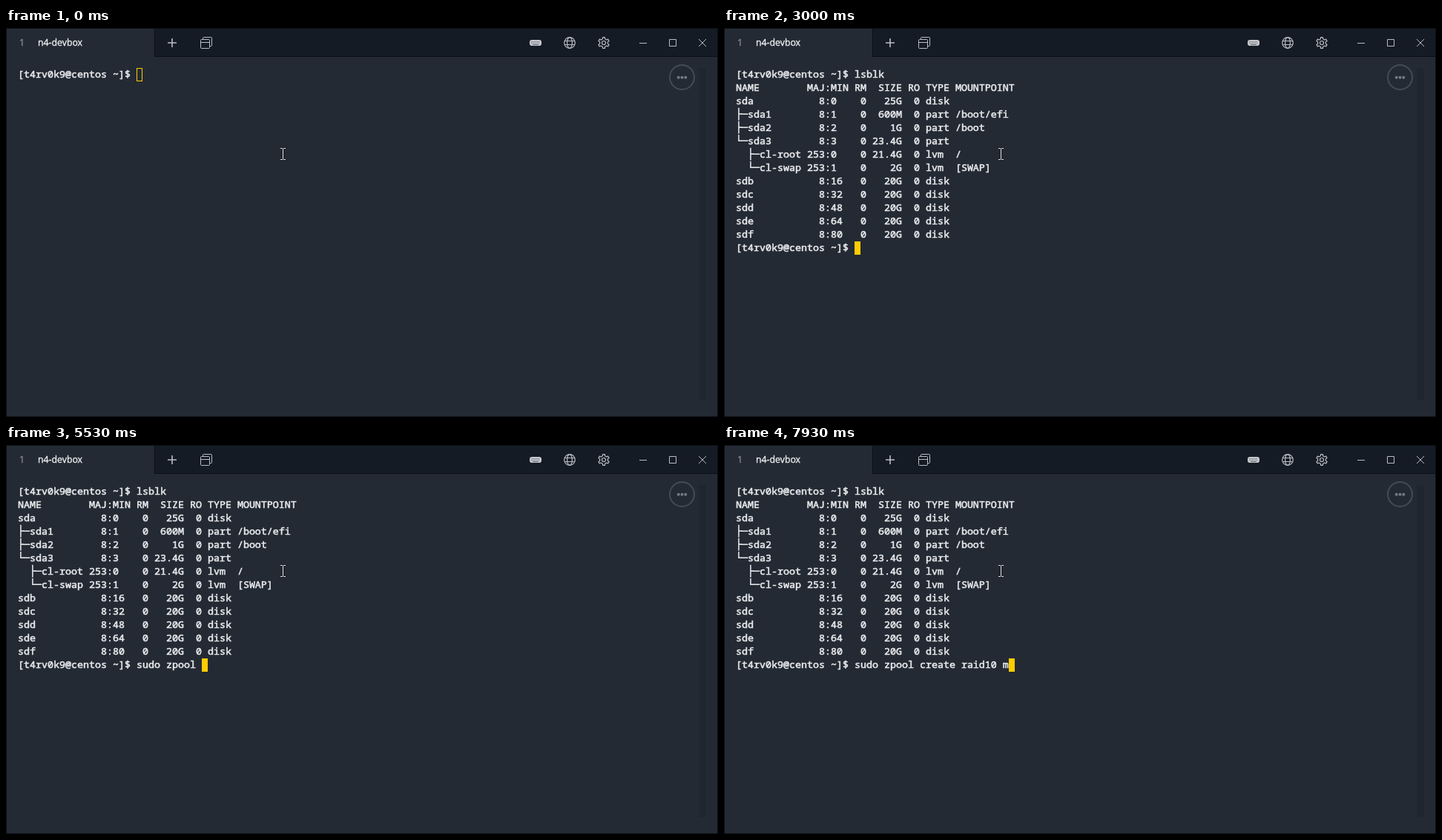
These frames come from a looping animation (960x525 px, 8000 ms). An HTML page:

```html
<!DOCTYPE html>
<html lang="en">
<head>
<meta charset="utf-8">
<title>Terminal</title>
<style>
  html, body { margin: 0; width: 100%; height: 100%; overflow: hidden; background: #242a34; }
  #stage { position: relative; width: 960px; height: 525px; overflow: hidden; background: #242a34; }
  #stage > * { position: absolute; }
  svg { left: 0; top: 0; }
  .label {
    font: 500 12.3px/16px "Open Sans", "Noto Sans", sans-serif; top: 12px; white-space: pre;
    -webkit-text-stroke: .35px currentColor;
  }
  #screen {
    left: 16px; top: 53px; margin: 0; color: #eaecee;
    font: 500 13.3333px/18px "Noto Sans Mono", "DejaVu Sans Mono", monospace;
    -webkit-text-stroke: .55px currentColor;
    font-variant-ligatures: none; white-space: pre;
  }
  #cursor { box-sizing: border-box; width: 8px; height: 18px; border: 1px solid #ffcc00; }
</style>
</head>
<body>
<div id="stage">
  <svg width="960" height="525" fill="none">
    <path fill="#141b25" d="M0 0H960V39H0z"/>
    <path fill="#242a34" d="M1 1H200V39H1z"/>
    <path stroke="#0b0f15" d="M200.5 0V38.5H960M.5 0V525M0 .5H960M959.5 0V525M0 524.5H960"/>
    <path fill="#1e2730" d="M934 54H944V503H934z"/>

    <g stroke="#b9bdc3">
      <path stroke-width="1.6" d="M218 20H230M224 14V26"/>
      <rect x="262.5" y="15.5" width="12" height="12" rx="1"/>
      <path d="M262.5 19.5H274.5M265.5 15V13.5Q265.5 12.5 266.5 12.5H276.5Q277.5 12.5 277.5 13.5V23.5Q277.5 24.5 276.5 24.5H275"/>
      <g stroke-width="1.2">
        <circle cx="760" cy="20" r="7.3"/>
        <ellipse cx="760" cy="20" rx="3.4" ry="7.3"/>
        <path d="M753.4 17.5H766.6M753.4 22.5H766.6"/>
        <path id="gear" stroke-linejoin="round"/>
        <circle cx="806" cy="20" r="2.5"/>
      </g>
      <path d="M854 20.5H864M894.5 15.5H903.5V24.5H894.5zM934 15L944 25M944 15L934 25"/>
    </g>

    <rect x="706" y="16" width="16" height="8" rx="3" fill="#c6c9ce"/>
    <path stroke="#5d636c" stroke-dasharray="1 1" d="M708 18.5H720M708 20.5H720"/>
    <path stroke="#5d636c" d="M710 22.5H718"/>

    <circle cx="911.5" cy="66.5" r="16.5" stroke="#434b56" stroke-width="2"/>
    <g fill="#747a83">
      <circle cx="906.7" cy="66.8" r="2"/><circle cx="911.5" cy="66.8" r="2"/><circle cx="916.3" cy="66.8" r="2"/>
    </g>
  </svg>

  <div class="label" style="left:18px; color:#858b94">1</div>
  <div class="label" style="left:43px; color:#eef0f2">n4-devbox</div>

  <pre id="screen"></pre>
  <div id="cursor"></div>

  <svg width="960" height="525" fill="none">
    <path stroke="#11151b" stroke-width="3" d="M370 162.5H377M373.5 162V178M370 177.5H377" opacity=".45"/>
    <path stroke="#e8eaec" d="M370 162.5H373M374 162.5H377M373.5 163V177M370 177.5H373M374 177.5H377"/>
  </svg>
</div>

<script>
const LOOP = 8000, CELL = 8, ROW = 18, LEFT = 16, TOP = 54;
const PROMPT = "[t4rv0k9@centos ~]$ ";
const LISTING = `NAME        MAJ:MIN RM  SIZE RO TYPE MOUNTPOINT
sda           8:0    0   25G  0 disk
├─sda1        8:1    0  600M  0 part /boot/efi
├─sda2        8:2    0    1G  0 part /boot
└─sda3        8:3    0 23.4G  0 part
  ├─cl-root 253:0    0 21.4G  0 lvm  /
  └─cl-swap 253:1    0    2G  0 lvm  [SWAP]
sdb           8:16   0   20G  0 disk
sdc           8:32   0   20G  0 disk
sdd           8:48   0   20G  0 disk
sde           8:64   0   20G  0 disk
sdf           8:80   0   20G  0 disk`;

const RUN_AT = 3000;
const before = PROMPT;
const after = PROMPT + "lsblk\n" + LISTING + "\n" + PROMPT;

// Each step: time, typed text, cursor look
const steps = [[0, "", "hollow"], [1330, "", "solid"], [1730, "", "off"], [2270, "", "solid"]];
const show = (time, text) => steps.push([time, text, "solid"]);

// Types chars after base, spread evenly from start to end
function type(base, chars, start, end = start) {
  const gap = chars.length > 1 ? (end - start) / (chars.length - 1) : 0;
  for (let i = 0; i < chars.length; i++) show(start + gap * i, base + chars.slice(0, i + 1));
}

type("", "lsb", 2470, 2600);
type("lsb", "lk", 2800, 2900);
show(RUN_AT, "");
type("", "sudo ", 3270, 3670);
type("sudo ", "zp", 3870, 3930);
show(4070, "sudo zpool ");
type("sudo zpool ", "vr", 4530, 4670);
show(5070, "sudo zpool v");
show(5530, "sudo zpool ");
type("sudo zpool ", "c", 5730);
type("sudo zpool c", "reate", 5930, 6330);
type("sudo zpool create", " ", 6600);
type("sudo zpool create ", "raid", 6870, 7200);
type("sudo zpool create raid", "1", 7530);
type("sudo zpool create raid1", "0 m", 7670, 7930);

const screen = document.getElementById("screen");
const cursor = document.getElementById("cursor");

function gearPath(cx, cy, teeth) {
  const points = [];
  const turn = 2 * Math.PI / teeth;
  for (let i = 0; i < teeth; i++) {
    for (const [part, r] of [[-.28, 5.5], [-.18, 7.5], [.18, 7.5], [.28, 5.5]]) {
      const a = (i + part) * turn - Math.PI / 2;
      points.push((cx + r * Math.cos(a)).toFixed(2) + " " + (cy + r * Math.sin(a)).toFixed(2));
    }
  }
  return "M" + points.join("L") + "z";
}
document.getElementById("gear").setAttribute("d", gearPath(806, 20, 6));

let shown = null;
function draw(time) {
  const step = steps.findLast(s => s[0] <= time);
  if (step === shown) return;
  shown = step;
  const [at, typed, look] = step;
  const text = (at < RUN_AT ? before : after) + typed;
  const lines = text.split("\n");
  screen.textContent = text;
  cursor.style.left = LEFT + CELL * lines.at(-1).length + "px";
  cursor.style.top = TOP + ROW * (lines.length - 1) + "px";
  cursor.style.visibility = look === "off" ? "hidden" : "visible";
  cursor.style.background = look === "solid" ? "#ffcc00" : "none";
}

const start = performance.now();
function tick() {
  draw((performance.now() - start) % LOOP);
  requestAnimationFrame(tick);
}
tick();
</script>
</body>
</html>
```
